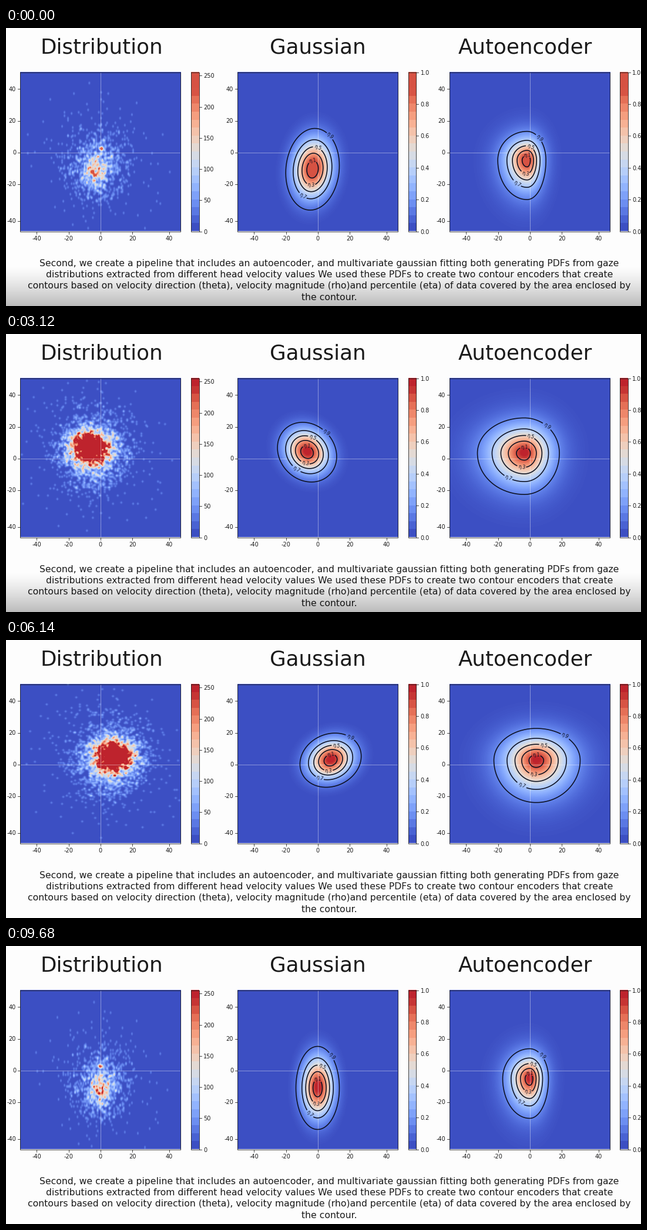
These frames come from a looping animation (1081 px wide and 475 px high, 9880 ms). A matplotlib script:

```python
import numpy as np
import matplotlib.pyplot as plt
from matplotlib.animation import FuncAnimation
from matplotlib.colors import ListedColormap

W, H, DPI = 1081, 475, 64
PT = 72 / DPI                      # points per pixel
STEP, FRAMES = 104, 95
TOP, SIDE, CENTER_Y = 75.5, 272, 212.5
PANELS = {"Distribution": 23.5, "Gaussian": 393.5, "Autoencoder": 754.5}

ETAS = np.array([0.1, 0.3, 0.5, 0.7, 0.9])
SIGMAS = np.sqrt(-2 * np.log(1 - ETAS))
OUTER = SIGMAS[-1]
AUTO_POWER = 1.15                  # spacing of the autoencoder contours

# Head direction over time (ms, degrees clockwise from right), with pauses.
PATH = np.array([(100, 108), (900, 170), (1200, 170), (2200, 208), (2400, 208),
                 (3120, 228), (4220, 270), (6140, 322), (6540, 322),
                 (6940, 349), (7360, 349), (8360, 416), (8660, 430),
                 (9480, 435), (9680, 450)])

rng = np.random.default_rng(7)


def heavy_noise(n, spread):
    return rng.standard_normal((n, 2)) * np.exp(spread * rng.standard_normal((n, 1)))


core_noise = heavy_noise(3000, 0.15)
halo_noise = heavy_noise(3000, 0.35)

axis = np.linspace(-SIDE / 2, SIDE / 2, 137)
GX, GY = np.meshgrid(axis, axis)
BINS = 136
cells = (np.arange(BINS) + 0.5) * SIDE / BINS - SIDE / 2
CX, CY = np.meshgrid(cells, cells)


def warm_map(cap):
    return ListedColormap(plt.get_cmap("coolwarm")(np.clip(np.linspace(0, 1, 256), 0.008, cap)))


muted_cmap, full_cmap = warm_map(0.90), warm_map(0.97)


class Pose:
    """All shapes follow from the head direction alone."""

    def __init__(self, t):
        angle = np.radians(np.interp(t, *PATH.T))
        self.c, self.s = np.cos(angle), np.sin(angle)
        self.side = abs(self.c)
        # strongest for diagonal upward directions
        self.rise = max(0, -2 * self.s * self.side)

    def scatter(self):
        c, s, side, rise = self.c, self.s, self.side, self.rise
        core_n = int(360 + 240 * c * c + 1800 * rise)
        halo_n = int(900 + 1000 * rise)
        core = core_noise[:core_n] * (13 + 4 * side + 4 * rise, 17) + (30 * c, 8 + 32 * s)
        halo = halo_noise[:halo_n] * (25 + 7 * side, 33) + (18 * c, 3 + 17 * s)
        xs, ys = np.vstack([core, halo]).T
        half = SIDE / 2
        grid = 95 * np.histogram2d(ys, xs, BINS, [[-half, half]] * 2)[0]
        for direction, share in ((0, s * s), (1, c * c)):
            k = 0.12 + 0.13 * share
            sides = np.roll(grid, 1, direction) + np.roll(grid, -1, direction)
            grid = (1 - 2 * k) * grid + k * sides
        spot = (CX + 5 * c) ** 2 + (CY + 1 + 4 * s) ** 2
        return grid + 280 * np.exp(-spot / 10)

    def gauss(self):
        c, s = self.c, self.s
        width = 37 + 17.5 * self.side ** 0.6
        height = 45 + 22 * s * s + 4 * s + 12 * s * c * c
        return 28 * c, 7 + 23 * s, width, height, 0.3 * s * c

    def auto(self):
        """Mode, then the reach of the outer contour to each side."""
        c, s, side, rise = self.c, self.s, self.side, self.rise
        right = 32 + 10 * side + 10 * c + 28 * rise
        left = 46 + 7 * side - 6 * c + 26 * rise
        down = 55 + 13 * s + 26 * rise
        up = 36 + 22 * s * s - 7 * s + 6 * rise
        return 14 * c, 1 + 13 * s, right, left, down, up


def gauss_map(p):
    x, y, a, b, rho = p
    u = (GX - x) / a
    v = ((GY - y) / b - rho * u) / np.sqrt(1 - rho ** 2)
    return np.exp(-(OUTER * np.hypot(u, v)) ** 2 / 2)


def gauss_curve(p, level, angle):
    x, y, a, b, rho = p
    k = SIGMAS[level] / OUTER
    c, s = np.cos(angle), np.sin(angle)
    return x + k * a * c, y + k * b * (rho * c + np.sqrt(1 - rho ** 2) * s)


def auto_map(p):
    x, y, right, left, down, up = p
    dx, dy = GX - x, GY - y
    reach = np.hypot(dx / np.where(dx > 0, right, left), dy / np.where(dy > 0, down, up))
    r2 = (OUTER * reach ** (1 / AUTO_POWER)) ** 2
    return 0.85 * np.exp(-r2 / 2) + 0.15 * np.exp(-r2 / 5)


def auto_curve(p, level, angle):
    x, y, right, left, down, up = p
    k = (SIGMAS[level] / OUTER) ** AUTO_POWER
    c, s = np.cos(angle), np.sin(angle)
    return x + k * c * np.where(c > 0, right, left), y + k * s * np.where(s > 0, down, up)


fig = plt.figure(figsize=(W / DPI, H / DPI), dpi=DPI, facecolor="#fdfdfd")
ax = fig.add_axes([0, 0, 1, 1])
ax.axis("off")


def label(x, y, text, size, color="#1a1a1a", **kw):
    return ax.text(x, y, text, fontsize=size * PT, family="DejaVu Sans", color=color, **kw)


def stroke(xs, ys, width=0.8, color="#1a1a1a", **kw):
    return ax.plot(xs, ys, color=color, lw=width * PT, **kw)[0]


def picture(data, left, width, vmax=1, smooth="bilinear"):
    return ax.imshow(data, extent=(left, left + width, TOP + SIDE, TOP),
                     vmin=0, vmax=vmax, cmap=full_cmap, aspect="auto",
                     interpolation=smooth, zorder=1)


def box(left, width):
    right, bottom = left + width, TOP + SIDE
    stroke([left, right, right, left, left], [TOP, TOP, bottom, bottom, TOP], zorder=4)


def middle(left):
    return left + SIDE / 2 + 1


def build_panel(left, vmax, bar_left, bar_ticks):
    heat = picture(np.zeros((BINS, BINS)), left, SIDE + 1.5, vmax=vmax)
    mid = middle(left)
    cross = dict(width=0.8, color="white", alpha=0.8, ls=(0, (1.6, 1)), zorder=2)
    stroke([left, left + SIDE], [CENTER_Y] * 2, **cross)
    stroke([mid, mid], [TOP, TOP + SIDE], **cross)
    box(left, SIDE + 1.5)
    for value, shift in zip(range(-40, 41, 20), (-108.5, -54, 0, 54.5, 117)):
        x, y = mid + shift, CENTER_Y + shift
        stroke([x, x], [348, 352])
        stroke([left - 4, left], [y, y])
        label(x, 359, value, 9.7, ha="center", va="center_baseline")
        label(left - 6.5, y - 0.5, -value, 9.7, ha="right", va="center_baseline")
    bar = picture(np.linspace(1, 0, 20)[:, None], bar_left, 13.5, smooth="nearest")
    box(bar_left, 13.5)
    right = bar_left + 13.5
    for text, share in bar_ticks:
        y = TOP + SIDE * (1 - share)
        stroke([right, right + 4], [y, y])
        label(right + 7.5, y, text, 9.7, va="center_baseline", clip_on=True)
    return heat, bar


class ContourSet:
    def __init__(self, left, curve):
        self.origin = np.array([middle(left), CENTER_Y])
        self.curve = curve
        ink = "#0c1020"
        self.lines = [stroke([], [], 1.6, ink, zorder=3) for _ in ETAS]
        self.tags = [label(0, 0, f"η{eta:.1f}".replace("0", ""), 7.8, ink, ha="center",
                           va="center", zorder=5) for eta in ETAS]

    def update(self, p):
        for level, (line, tag) in enumerate(zip(self.lines, self.tags)):
            # neighbouring labels sit on nearly opposite sides
            start = np.radians(310 + 170 * (4 - level))
            turn = start + np.linspace(0, 2 * np.pi, 161)
            pts = np.column_stack(self.curve(p, level, turn)) + self.origin
            s = np.r_[0, np.cumsum(np.hypot(*np.diff(pts, axis=0).T))]
            gap = min(8, 0.13 * s[-1])
            line.set_data(*pts[(s > gap) & (s < s[-1] - gap)].T)
            tx, ty = pts[1] - pts[-2]
            tag.set_position(pts[0])
            tag.set_rotation((np.degrees(np.arctan2(-ty, tx)) + 90) % 180 - 90)


unit_ticks = [(f"{v / 5:.1f}", v / 5) for v in range(6)]
count_ticks = [(v, v / 255.5) for v in range(0, 251, 50)]
left_d, left_g, left_a = PANELS.values()
heat_d, bar_d = build_panel(left_d, 255, 315, count_ticks)
heat_g, bar_g = build_panel(left_g, 1, 684.8, unit_ticks)
heat_a, bar_a = build_panel(left_a, 1, 1045.3, unit_ticks)
colored = [heat_d, heat_g, heat_a, bar_d, bar_g, bar_a]
gauss_lines = ContourSet(left_g, gauss_curve)
auto_lines = ContourSet(left_a, auto_curve)

for title, x in zip(PANELS, (163, 531, 883.5)):
    label(x, 44, title, 35.6, ha="center", va="baseline")

CAPTION = (
    "Second, we create a pipeline that includes an autoencoder, and multivariate "
    "gaussian fitting both generating PDFs from gaze",
    "distributions extracted from different head velocity values We used these PDFs "
    "to create two contour encoders that create",
    "contours based on velocity direction (theta), velocity magnitude (rho)and "
    "percentile (eta) of data covered by the area enclosed by",
    "the contour.")
for row, text in enumerate(CAPTION):
    label(550.5, 406.7 + 19.3 * row, text, 15.58, ha="center", va="baseline")

shade = np.zeros((70, 1, 4))
shade[:, 0, 3] = 0.26 * np.linspace(0, 1, 70) ** 1.3
shadow = ax.imshow(shade, extent=(0, W, H, H - 70), aspect="auto", zorder=10)
ax.set_xlim(0, W)
ax.set_ylim(H, 0)


def update(i):
    t = (i + 0.5) * STEP
    pose = Pose(t)
    gauss, auto = pose.gauss(), pose.auto()
    heat_d.set_data(pose.scatter())
    heat_g.set_data(gauss_map(gauss))
    heat_a.set_data(auto_map(auto))
    gauss_lines.update(gauss)
    auto_lines.update(auto)
    for image in colored:
        image.set_cmap(muted_cmap if t < 2400 else full_cmap)
    shadow.set_alpha(float(np.interp(t, (3250, 3650), (1, 0))))
    return []


anim = FuncAnimation(fig, update, frames=FRAMES, interval=STEP, repeat=True,
                     repeat_delay=0, blit=False)
plt.show()
```
